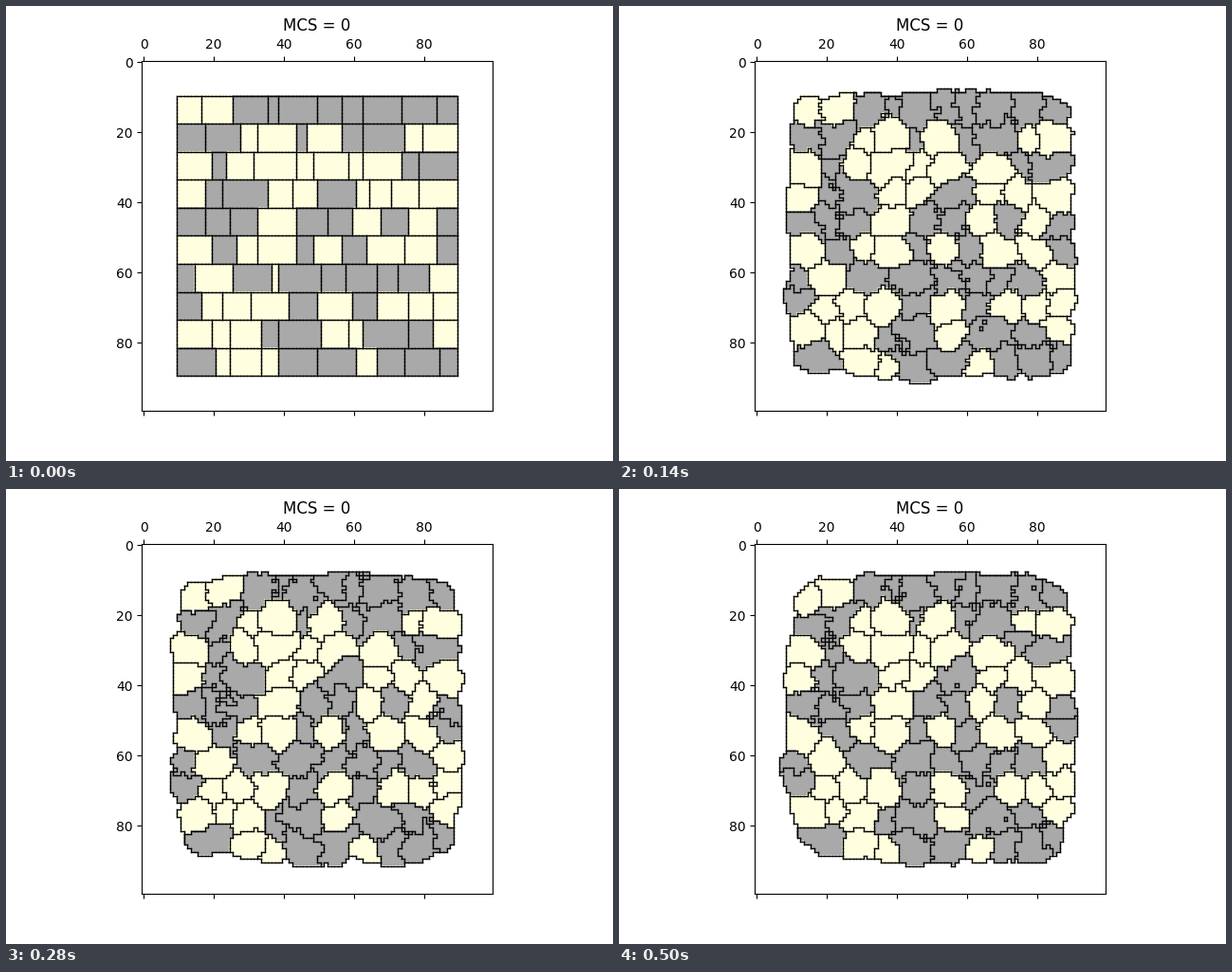
Write a matplotlib script that moves like this. It is 640 by 480 pixels and loops after 520 ms.

```python
import itertools

import numpy as np
import matplotlib.pyplot as plt
from matplotlib.animation import FuncAnimation
from matplotlib.collections import LineCollection
from matplotlib.colors import ListedColormap

SIZE = 100
MARGIN = 10
ROW_HEIGHT = 8
MEDIUM, PALE, DARK = 0, 1, 2

# Widths of the cells in each starting row; negative means dark.
ROWS = [
    [7, 9, -10, -3, -11, -7, -6, -11, -10, -6],
    [-8, -10, 5, 11, -3, 10, -6, -12, 5, 10],
    [10, -4, 8, 12, 5, 10, 4, 11, -5, -11],
    [8, -5, -13, 7, 7, -11, 4, 6, 8, 11],
    [-8, -7, -8, 11, -9, -7, 8, -8, 8, -6],
    [10, -7, 6, 11, -5, 8, -7, 11, 9, -6],
    [-5, 11, -11, 2, -12, -7, -9, -6, -9, 8],
    [-7, 6, 8, 11, -8, 10, -7, 9, 7, 7],
    [10, 5, 9, -5, -12, 8, 4, -13, -7, 7],
    [-11, 4, 9, 5, -11, -11, 6, -8, -10, -5],
]

# Contact energy between medium, pale and dark.
CONTACT = np.array([[0, 16, 16], [16, 9, 9], [16, 9, 2]])
PULL = {PALE: 0.2, DARK: 0.07}
TEMPERATURE = 9
THINNEST_PALE = 5
GROWTH = 1.06
ROUNDING = 0.1

TICK_MS = 20
HOLDS = [1, 5, 1, 5, 1] * 2
FIRST_SWEEPS, SWEEPS = 14, 8

STEPS = [dy * SIZE + dx
         for dy, dx in itertools.product((-1, 0, 1), repeat=2) if dy or dx]


def resting_place(x, y):
    """Draw the corners of the block inwards, leave its sides alone."""
    half = SIZE / 2
    u, v = (x - half) / (half - MARGIN), (y - half) / (half - MARGIN)
    return (half + (half - MARGIN) * u * (1 - ROUNDING * v ** 4),
            half + (half - MARGIN) * v * (1 - ROUNDING * u ** 4))


def build_tissue():
    """Lay out the starting bricks and what each cell strives for."""
    grid = np.zeros((SIZE, SIZE), int)
    kinds, goals, homes = [MEDIUM], [0], [(0, 0)]
    for r, row in enumerate(ROWS):
        top, left = MARGIN + r * ROW_HEIGHT, MARGIN
        for signed in row:
            width = abs(signed)
            kind = PALE if signed > 0 else DARK
            dissolves = kind == PALE and width < THINNEST_PALE
            grid[top:top + ROW_HEIGHT, left:left + width] = len(kinds)
            kinds.append(kind)
            goals.append(0 if dissolves else width * ROW_HEIGHT)
            homes.append(resting_place(left + (width - 1) / 2,
                                       top + (ROW_HEIGHT - 1) / 2))
            left += width

    # The cells that stay share the room of those that dissolve.
    goals = np.array(goals) * GROWTH * np.count_nonzero(grid) / sum(goals)
    ys, xs = np.mgrid[:SIZE, :SIZE]
    fields = [np.zeros(SIZE * SIZE)]
    for kind, goal, (x, y) in zip(kinds[1:], goals[1:], homes[1:]):
        reach = (xs - x) ** 2 + (ys - y) ** 2 - goal / np.pi
        fields.append(PULL[kind] * reach.ravel())
    return grid, np.array(kinds), goals.tolist(), [f.tolist() for f in fields]


def evolve(sites, sweeps, areas, goals, fields, bonds, rng):
    """Metropolis copy attempts of a cellular Potts model, in place."""
    edge = 3
    span = SIZE - 2 * edge
    count = sweeps * span * span
    ys, xs = rng.integers(edge, SIZE - edge, (2, count))
    spots = (ys * SIZE + xs).tolist()
    moves = np.array(STEPS)[rng.integers(0, len(STEPS), count)].tolist()
    limits = rng.exponential(TEMPERATURE, count).tolist()
    for spot, move, limit in zip(spots, moves, limits):
        old, new = sites[spot], sites[spot + move]
        if old == new:
            continue
        gain, loss = bonds[new], bonds[old]
        cost = fields[new][spot] - fields[old][spot]
        for step in STEPS:
            other = sites[spot + step]
            cost += gain[other] - loss[other]
        if new:
            cost += 1 + 2 * (areas[new] - goals[new])
        if old:
            cost += 1 - 2 * (areas[old] - goals[old])
        if cost < limit:
            sites[spot] = new
            areas[new] += 1
            areas[old] -= 1


def simulate():
    grid, kinds, goals, fields = build_tissue()
    bonds = CONTACT[kinds][:, kinds]
    np.fill_diagonal(bonds, 0)
    bonds = bonds.tolist()
    rng = np.random.default_rng(7)
    areas = np.bincount(grid.ravel(), minlength=len(kinds)).tolist()
    sites = grid.ravel().tolist()
    states = [grid]
    for i in range(1, len(HOLDS)):
        sweeps = FIRST_SWEEPS if i == 1 else SWEEPS
        evolve(sites, sweeps, areas, goals, fields, bonds, rng)
        states.append(np.array(sites).reshape(SIZE, SIZE))
    return states, kinds


def membranes(grid):
    """Unit segments wherever two different cells touch."""
    y, x = np.nonzero(grid[:, :-1] != grid[:, 1:])
    upright = np.stack([x + 0.5, y - 0.5, x + 0.5, y + 0.5], axis=1)
    y, x = np.nonzero(grid[:-1] != grid[1:])
    level = np.stack([x - 0.5, y + 0.5, x + 0.5, y + 0.5], axis=1)
    return np.concatenate([upright, level]).reshape(-1, 2, 2)


states, kinds = simulate()
outlines = [membranes(grid) for grid in states]
ends = np.cumsum(HOLDS)

fig, ax = plt.subplots(figsize=(6.4, 4.8), dpi=100)
image = ax.matshow(kinds[states[0]], vmin=MEDIUM, vmax=DARK,
                   cmap=ListedColormap(["white", "lightyellow", "darkgray"]))
lines = LineCollection(outlines[0], colors="black", linewidths=1,
                       capstyle="projecting")
ax.add_collection(lines, autolim=False)
ax.set_title("MCS = 0")


def draw(tick):
    i = np.searchsorted(ends, tick, side="right")
    image.set_data(kinds[states[i]])
    lines.set_segments(outlines[i])
    return image, lines


anim = FuncAnimation(fig, draw, frames=sum(HOLDS), interval=TICK_MS, repeat=True)
plt.show()
```
